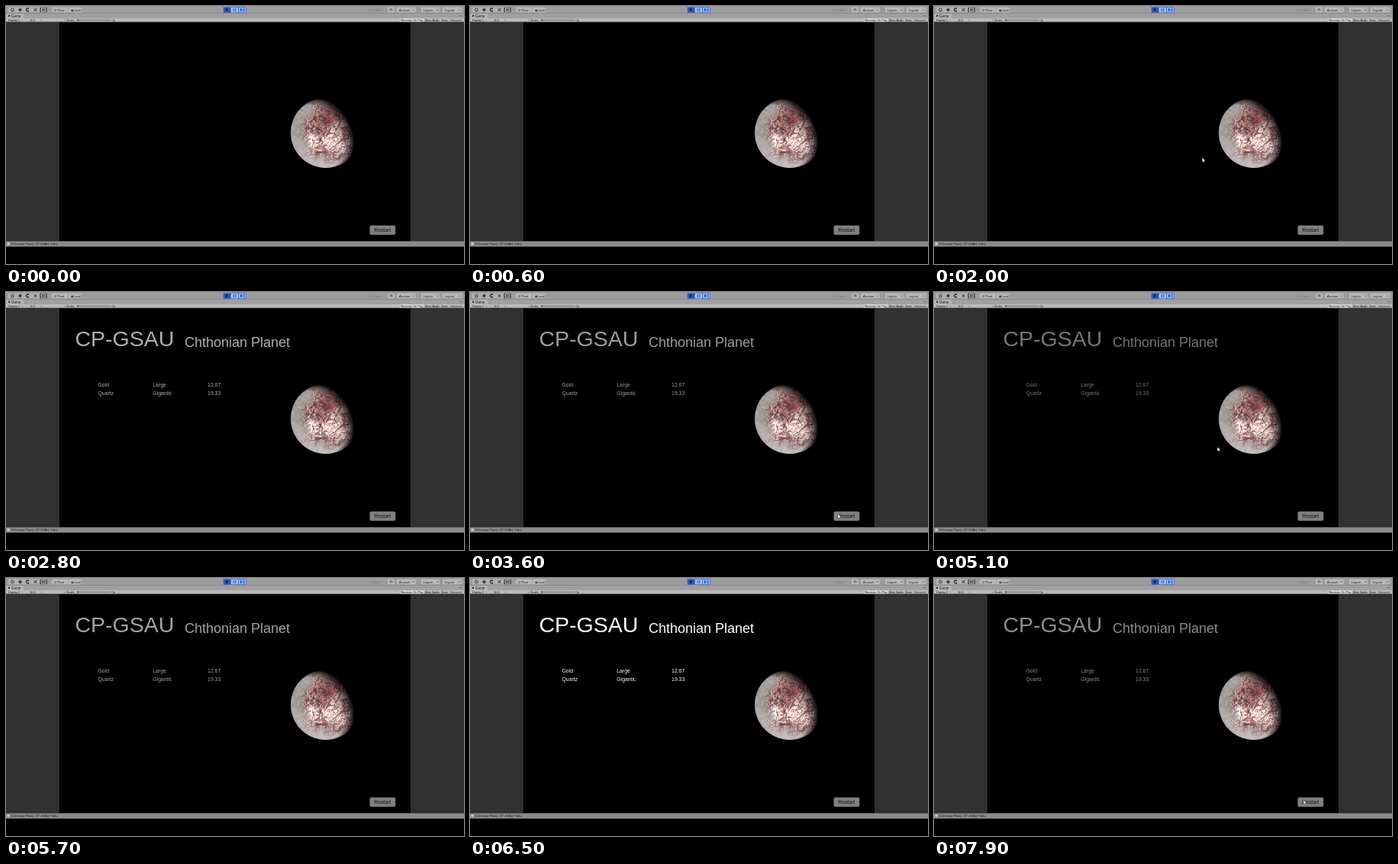
Animation of 600 by 338 pixels, one loop 8 s. Source, as an HTML page with a canvas:

```html
<!DOCTYPE html>
<html lang="en">
<head>
<meta charset="utf-8">
<title>Planet viewer</title>
<style>
html, body { margin: 0; width: 100%; height: 100%; overflow: hidden; background: #000; }
canvas { display: block; width: 600px; height: 338px; }
</style>
</head>
<body>
<canvas id="stage" width="600" height="338"></canvas>
<script>
const ctx = document.getElementById('stage').getContext('2d');
const LOOP = 8000, STEP = 100;
const SANS = '"Liberation Sans", Arial, sans-serif';

// Keyframes: [time, value...]
const FADE = [[2050, 0], [3150, 1], [3200, 1], [3800, .42], [4440, 1],
  [4500, 1], [5300, .28], [6100, 1], [7400, 1], [8000, .46]];
const POINTER = [[2000, 351.5, 199], [2200, 396, 176], [2700, 404, 180], [3100, 430, 186],
  [3450, 481, 290], [3600, 482, 291], [3700, 478, 282], [3900, 436, 188], [4300, 399, 180],
  [4600, 376.5, 204], [4900, 366, 208], [5200, 374, 201], [5500, 410, 180],
  [6800, 416, 182], [7300, 428, 187], [7700, 483, 290], [7900, 484, 291]];

function sample(keys, t) {
  if (t <= keys[0][0]) return keys[0].slice(1);
  for (let i = 1; i < keys.length; i++) {
    const a = keys[i - 1], b = keys[i];
    if (t <= b[0]) {
      const p = (t - a[0]) / (b[0] - a[0]);
      return a.slice(1).map((v, j) => v + (b[j + 1] - v) * p);
    }
  }
  return keys[keys.length - 1].slice(1);
}

function box(g, x, y, w, h, color, radius = 0) {
  g.fillStyle = color;
  g.beginPath();
  g.roundRect(x, y, w, h, radius);
  g.fill();
}

function label(g, text, x, y, size, color = '#1c1c1c') {
  g.font = `${size}px ${SANS}`;
  g.fillStyle = color;
  g.fillText(text, x, y);
}

function stroke(g, points, color = '#333', width = 1) {
  g.strokeStyle = color;
  g.lineWidth = width;
  g.beginPath();
  points.forEach(([x, y]) => g.lineTo(x, y));
  g.stroke();
}

function triangle(g, x, color) {
  g.fillStyle = color;
  g.beginPath();
  g.moveTo(x, 2.8);
  g.lineTo(x + 3.4, 5);
  g.lineTo(x, 7.2);
  g.fill();
}

function layer(w, h) {
  const c = document.createElement('canvas');
  c.width = w;
  c.height = h;
  return c;
}

const hash = (x, y) => {
  const s = Math.sin(x * 127.1 + y * 311.7) * 43758.5453;
  return s - Math.floor(s);
};

function noise(x, y) {
  const ix = Math.floor(x), iy = Math.floor(y);
  const ease = v => v * v * (3 - 2 * v);
  const u = ease(x - ix), v = ease(y - iy);
  const top = hash(ix, iy) * (1 - u) + hash(ix + 1, iy) * u;
  const low = hash(ix, iy + 1) * (1 - u) + hash(ix + 1, iy + 1) * u;
  return top * (1 - v) + low * v;
}

const clamp = v => Math.max(0, Math.min(1, v));
const ridge = (x, y) => 1 - Math.abs(noise(x, y) * 2 - 1);
const mix = (a, b, p) => a.map((v, i) => v + (b[i] - v) * p);
const spot = (dx, dy, spread) => Math.exp(-(dx * dx + dy * dy) / spread);

function makePlanet() {
  const size = 94, r = 46, c = layer(size, size), g = c.getContext('2d');
  const img = g.createImageData(size, size);
  for (let y = 0; y < size; y++) for (let x = 0; x < size; x++) {
    const px = x - size / 2 + .5, py = y - size / 2 + .5;
    const nx = px / r, ny = py / r, d = Math.hypot(nx, ny);
    const nz = Math.sqrt(Math.max(0, 1 - d * d));
    const light = clamp((-.67 * nx + .36 * ny + .65 * nz + .12) * 2.3);
    const patch = noise(px / 8 + 30, py / 8 + 12);
    const glow = Math.max(spot(px - 10, py - 13, 170), spot(px + 20, py - 12, 130));
    const shade = spot(px - 1, py + 20, 200);
    // Long thin cracks run along both diagonals.
    const veins = Math.max(ridge((px + py * .5) / 3 + 50, (py - px * .5) / 8),
      ridge((px - py * .7) / 7 + 9, (py + px * .7) / 3 + 70));
    // The pattern dissolves into a grey rim on the lit limb.
    const edge = .98 - Math.hypot(nx - .2, ny * .97 + .06) + (patch - .5) * .25;
    const surface = clamp(edge * 3.5);
    let rgb = mix([170, 142, 138], [255, 246, 240], clamp(patch * .6 + glow * .75 - shade * .5));
    const red = clamp((noise(px / 1.6 + 80, py / 1.6) - .42) * 2.2);
    rgb = mix(rgb, [172, 58, 60], red * (.75 - glow * .3));
    rgb = mix(rgb, [52, 28, 28], clamp((veins - .8) * 4.5) * (.8 - glow * .3));
    rgb = mix(rgb, [85, 32, 32], shade * .35);
    const grey = 150 + 26 * noise(px / 3, py / 3) + 30 * clamp(ny);
    rgb = mix([grey, grey * .97, grey * .96], rgb, surface);
    const i = (y * size + x) * 4;
    rgb.forEach((v, k) => { img.data[i + k] = v * light; });
    img.data[i + 3] = 255 * clamp((1 - d) * r + .5);
  }
  g.putImageData(img, 0, 0);
  return c;
}

function toolButton(g, x, w, text) {
  box(g, x, 1.7, w, 6.6, '#b8b8b8', 1);
  label(g, text, x + 3, 6.6, 4);
}

function dropdown(g, x, w, text) {
  toolButton(g, x, w, text);
  stroke(g, [[x + w - 4, 4.5], [x + w - 2.8, 5.7], [x + w - 1.6, 4.5]], '#333', .7);
}

function drawPlayButtons(g) {
  box(g, 284.5, 1.2, 30.5, 7.8, '#3f70cf', 1);
  box(g, 285.5, 1.9, 8.4, 6.4, '#2a55b4', .5);
  box(g, 294.8, 1.9, 9.2, 6.4, '#a3c4fa', .5);
  box(g, 305, 1.9, 9.2, 6.4, '#8ab4fa', .5);
  triangle(g, 288, '#0e1b48');
  box(g, 297.5, 2.8, 1.4, 4.4, '#3566c8');
  box(g, 300, 2.8, 1.4, 4.4, '#3566c8');
  triangle(g, 307, '#2456c0');
  box(g, 311, 2.8, 1.2, 4.4, '#2456c0');
}

function drawToolbar(g) {
  box(g, 0, 0, 600, 10, '#9c9c9c');
  box(g, 0, 9.5, 600, .7, '#7c7c7c');
  box(g, 3, 1.7, 51, 6.6, '#b0b0b0', 1);
  box(g, 44, 1.7, 10, 6.6, '#5c5c5c', 1);
  g.strokeStyle = '#333';
  g.lineWidth = 1;
  g.beginPath();
  g.arc(8.5, 5, 1.9, 0, 7);
  g.stroke();
  stroke(g, [[16, 5], [21, 5]], '#222', 1.3);
  stroke(g, [[18.5, 2.5], [18.5, 7.5]], '#222', 1.3);
  g.lineWidth = 1.2;
  g.beginPath();
  g.arc(28.5, 5, 1.9, .6, 5.6);
  g.stroke();
  stroke(g, [[36.5, 3], [40.5, 7]], '#222');
  stroke(g, [[36.5, 7], [40.5, 3]], '#222');
  g.strokeStyle = '#ccc';
  g.lineWidth = .7;
  g.strokeRect(46.5, 3, 5, 4);

  toolButton(g, 60, 21, '⊡ Pivot');
  toolButton(g, 82, 17, '◉Local');
  drawPlayButtons(g);
  label(g, '✓Collab ▾', 474, 6.5, 4.2, '#777');
  toolButton(g, 500, 9, '');
  box(g, 502, 4.2, 5, 2, '#777', 1);
  box(g, 503.2, 3, 2.6, 2.5, '#777', 1.2);
  dropdown(g, 512, 25, 'Account');
  dropdown(g, 544, 24, 'Layers');
  dropdown(g, 572, 25, 'Layout');
}

function drawTabs(g) {
  box(g, 0, 10, 600, 6, '#a0a0a0');
  box(g, 0, 10.2, 23, 6, '#b4b4b4', 1);
  box(g, 3, 11.7, 2.3, 2.3, '#222', 1);
  label(g, 'Game', 7, 14.9, 4.5);
  label(g, '▪≡', 594, 14.4, 3.5, '#444');
  box(g, 0, 16, 600, 5, '#bababa');
  box(g, 0, 20.6, 600, .7, '#6a6a6a');
  label(g, 'Display 1  ÷', 3, 19.7, 3.7);
  label(g, '16:9       ÷', 31, 19.7, 3.7);
  label(g, '⌕ Scale', 76, 19.8, 4);
  stroke(g, [[93, 18.4], [138, 18.4]], '#666', .9);
  box(g, 93, 17.2, 2.4, 2.4, '#555', 1.2);
  label(g, '1x', 139, 19.7, 3.8);
  box(g, 516, 16.3, 31, 4.2, '#dcdcdc');
  label(g, 'Maximize On Play', 517, 19.7, 3.65);
  label(g, 'Mute Audio', 549, 19.7, 3.75);
  label(g, 'Stats', 570, 19.7, 3.8);
  label(g, 'Gizmos ▾', 582, 19.7, 3.6);
}

function makeScene() {
  const c = layer(600, 338), g = c.getContext('2d');
  box(g, 0, 0, 600, 338, '#000');
  drawToolbar(g);
  drawTabs(g);
  box(g, 0, 21, 70, 287, '#313131');
  box(g, 530, 21, 70, 287, '#313131');
  box(g, 0, 308, 600, 7.3, '#8a8a8a');
  box(g, 0, 308, 600, .7, '#666');
  box(g, 1.5, 310, 3, 3, '#d0d0d0', .8);
  label(g, 'Chthonian Planet, CP-GSAU, False', 6.5, 313.2, 3.9);
  g.drawImage(makePlanet(), 372, 119);
  box(g, 476.5, 287.4, 33.7, 12.3, '#808080', 1.6);
  label(g, 'Restart', 482.2, 296, 6.85, '#151515');
  return c;
}

function drawInfo(alpha) {
  ctx.globalAlpha = alpha;
  const white = '#fff';
  label(ctx, 'CP-GSAU', 90.5, 71.2, 28.5, white);
  label(ctx, 'Chthonian Planet', 234, 72, 18, white);
  [['Gold', 'Large', '12.67'], ['Quartz', 'Gigantic', '19.33']].forEach((row, i) => {
    row.forEach((text, j) => label(ctx, text, 120.5 + j * 71.8, 123.8 + i * 11.4, 6.85, white));
  });
  ctx.globalAlpha = 1;
}

function drawPointer(x, y) {
  ctx.beginPath();
  [[0, 0], [0, 5], [1.2, 4], [2, 5.7], [2.8, 5.3], [2.1, 3.7], [3.6, 3.6]]
    .forEach(([dx, dy]) => ctx.lineTo(x + dx, y + dy));
  ctx.closePath();
  ctx.strokeStyle = '#111';
  ctx.lineWidth = .8;
  ctx.stroke();
  ctx.fillStyle = '#fff';
  ctx.fill();
}

const scene = makeScene();

function frame(now) {
  const t = Math.floor((now % LOOP) / STEP) * STEP;
  ctx.drawImage(scene, 0, 0);
  drawInfo(sample(FADE, t)[0]);
  if (t >= POINTER[0][0]) drawPointer(...sample(POINTER, t));
  requestAnimationFrame(frame);
}
requestAnimationFrame(frame);
</script>
</body>
</html>
```
